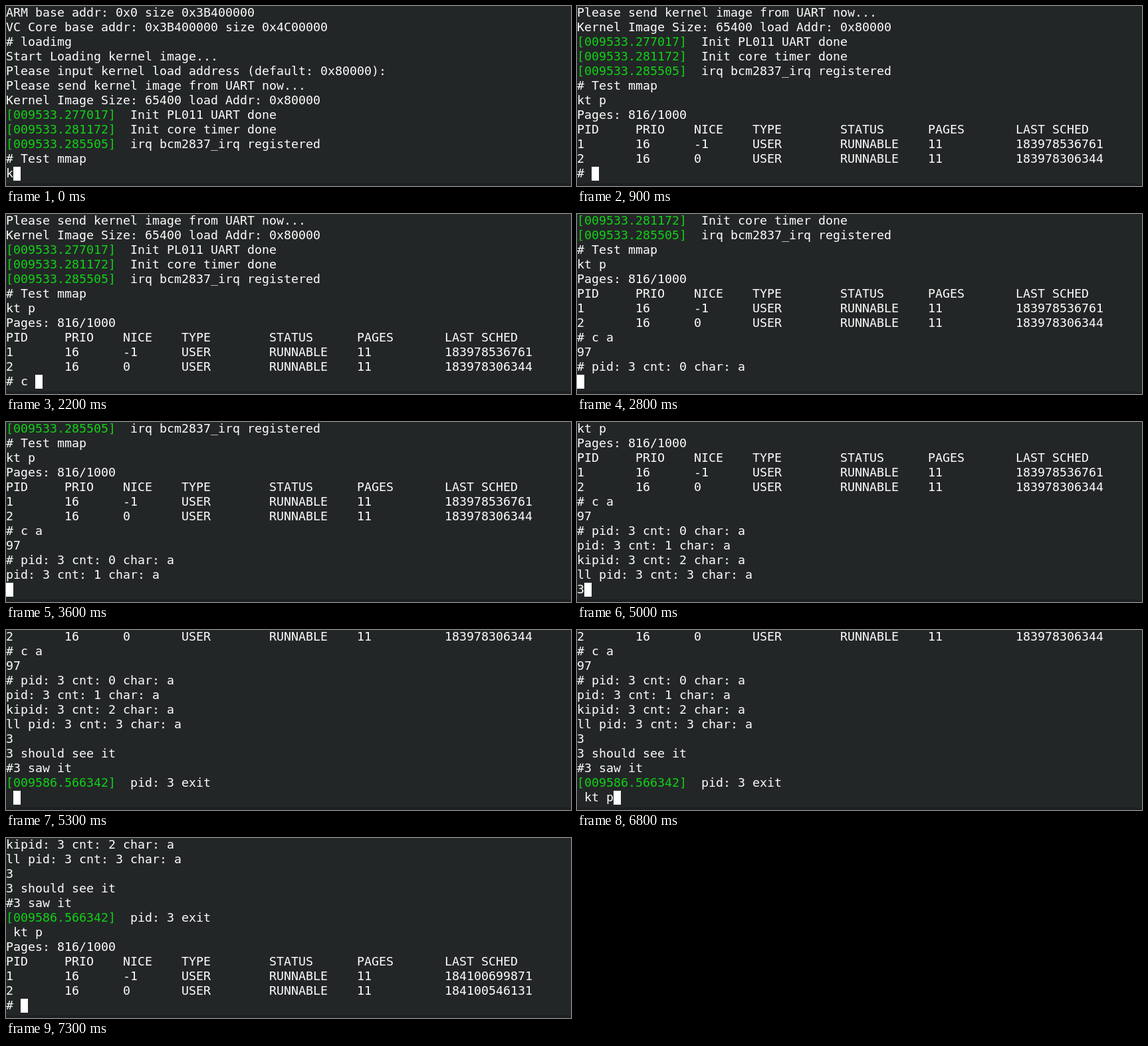
These frames come from a looping animation (850x271 px, 8000 ms). An HTML page with a canvas:

```html
<!DOCTYPE html>
<html lang="en">
<head>
<meta charset="utf-8">
<title>Terminal session</title>
<style>
  html, body { margin: 0; width: 100%; height: 100%; overflow: hidden; background: #232627; }
  canvas { display: block; }
</style>
</head>
<body>
<canvas id="screen" width="850" height="271"></canvas>
<script>
const LOOP = 8000, ROWS = 12, CELL_W = 11, CELL_H = 22, BASELINE = 16;
const WHITE = '#fcfcfc', GREEN = '#11d116';
const ctx = document.getElementById('screen').getContext('2d', { alpha: false });

const COLUMNS = [8, 8, 8, 12, 12, 12, 0];
const tableRow = cells => cells.map((cell, i) => cell.padEnd(COLUMNS[i])).join('');

const processList = (first, second) => '\n' + [
  'Pages: 816/1000',
  tableRow(['PID', 'PRIO', 'NICE', 'TYPE', 'STATUS', 'PAGES', 'LAST SCHED']),
  tableRow(['1', '16', '-1', 'USER', 'RUNNABLE', '11', first]),
  tableRow(['2', '16', '0', 'USER', 'RUNNABLE', '11', second]),
  '# '
].join('\n');

const count = n => `pid: 3 cnt: ${n} char: a\n`;

const BOOT = `ARM base addr: 0x0 size 0x3B400000
VC Core base addr: 0x3B400000 size 0x4C00000
# loadimg
Start Loading kernel image...
Please input kernel load address (default: 0x80000):
Please send kernel image from UART now...
Kernel Image Size: 65400 load Addr: 0x80000
[009533.277017]  Init PL011 UART done
[009533.281172]  Init core timer done
[009533.285505]  irq bcm2837_irq registered
# Test mmap
k`;

// Text appended to the terminal at each time (ms)
const OUTPUT = [
  [0, BOOT],
  [100, 't '],
  [400, 'p'],
  [900, processList('183978536761', '183978306344')],
  [2200, 'c '],
  [2400, 'a'],
  [2800, '\n97\n# ' + count(0)],
  [3600, count(1)],
  [4100, 'k'],
  [4300, 'i' + count(2)],
  [4600, 'll'],
  [4800, ' '],
  [5000, count(3) + '3'],
  [5300, '\n3 should see it\n#3 saw it\n[009586.566342]  pid: 3 exit\n '],
  [6200, 'kt'],
  [6400, ' '],
  [6800, 'p'],
  [7300, processList('184100699871', '184100546131')]
];

function drawLine(line, row) {
  // Each word starts on its own character cell
  for (const { 0: word, index } of line.matchAll(/\S+/g)) {
    ctx.fillStyle = /^\[[\d.]+\]$/.test(word) ? GREEN : WHITE;
    ctx.fillText(word, index * CELL_W, row * CELL_H + BASELINE);
  }
}

function draw(text) {
  const lines = text.split('\n').slice(-ROWS);
  ctx.fillStyle = '#232627';
  ctx.fillRect(0, 0, 850, 271);
  ctx.fillStyle = '#1d2022';
  ctx.fillRect(0, 267, 850, 4);
  ctx.font = '18.27px "DejaVu Sans Mono", monospace';
  lines.forEach(drawLine);
  ctx.fillStyle = '#ffffff';
  ctx.fillRect(lines.at(-1).length * CELL_W, (lines.length - 1) * CELL_H, CELL_W, CELL_H - 1);
}

const start = performance.now();
let shown = 0;

function tick() {
  const time = Math.max(0, performance.now() - start) % LOOP;
  const visible = OUTPUT.filter(([at]) => at <= time);
  if (visible.length !== shown) {
    shown = visible.length;
    draw(visible.map(([, text]) => text).join(''));
  }
  requestAnimationFrame(tick);
}
tick();
</script>
</body>
</html>
```
